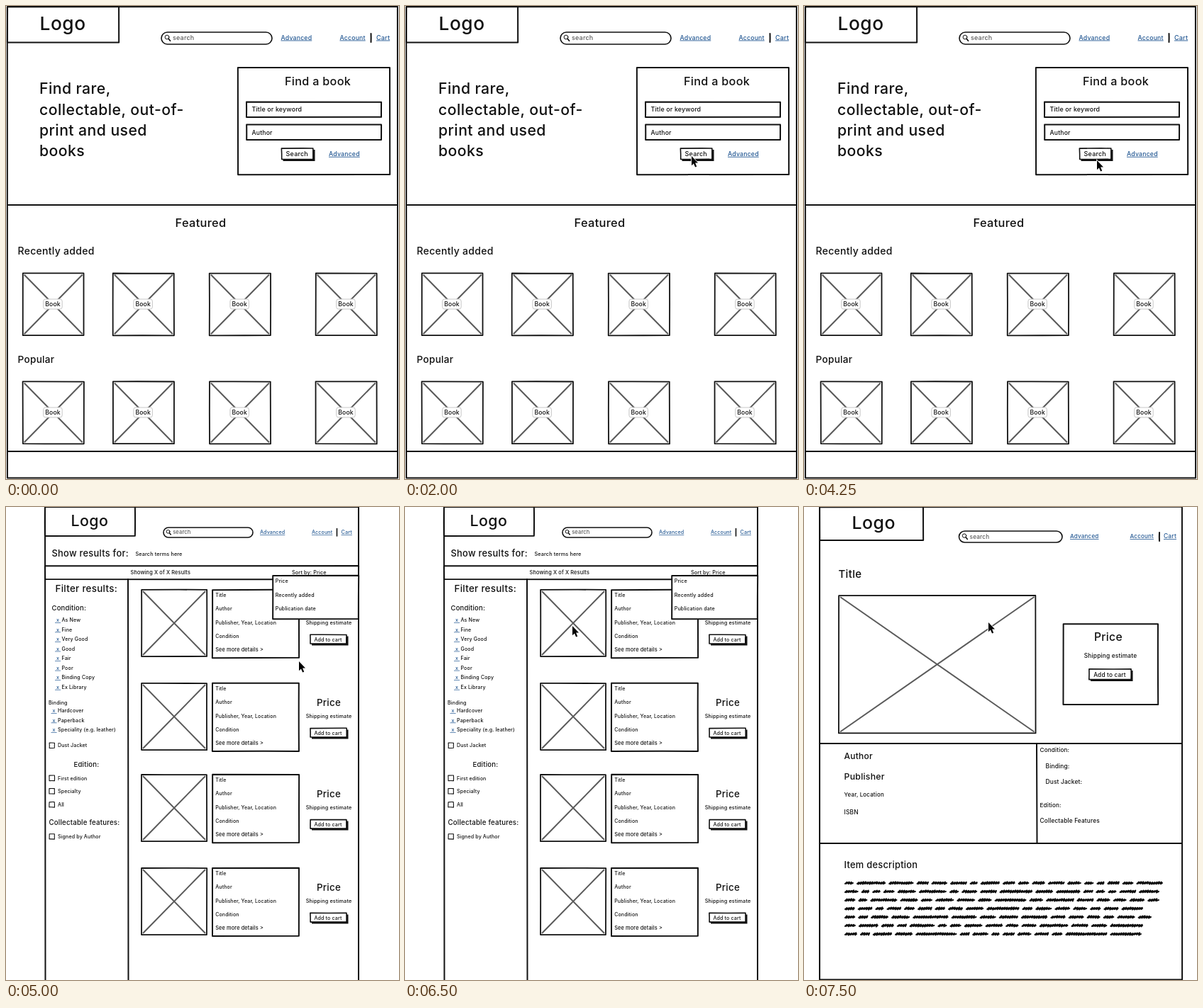
An HTML page that plays this animation: 554 by 668 pixels, repeating every 8 s.

```html
<!DOCTYPE html>
<html lang="en">
<head>
<meta charset="utf-8">
<title>Bookshop wireframe</title>
<style>
html, body { margin: 0; width: 100%; height: 100%; overflow: hidden; background: #fff; }
svg { display: block; }
text { font-family: Inter, "Open Sans", sans-serif; font-weight: 500; letter-spacing: 0.02em; fill: #111; white-space: pre; }
.link { fill: #265a94; text-decoration: underline; }
.hint { fill: #5c5c5c; }
.ink { stroke: #111; fill: none; stroke-linejoin: round; stroke-linecap: round; }
.cross { stroke: #5a5a5a; stroke-width: 2; fill: none; }
</style>
</head>
<body>
<svg id="stage" width="554" height="668" viewBox="0 0 554 668"></svg>
<script>
let seed = 7;
const rand = () => (seed = (seed * 16807) % 2147483647) / 2147483647;
const wob = a => (rand() - 0.5) * a;
const n = v => v.toFixed(2);

const text = (x, y, size, s, cls = '', anchor = 'start') =>
  `<text x="${x}" y="${y}" font-size="${n(size * 0.94)}" class="${cls}" text-anchor="${anchor}">${s.replace('>', '&gt;')}</text>`;
const link = (x, y, size, s) => text(x, y, size, s, 'link');
const mid = (x, y, size, s) => text(x, y, size, s, '', 'middle');

// Hand-drawn line: a straight run with a slight bow
const bow = (x1, y1, x2, y2) =>
  `Q${n((x1 + x2) / 2 + wob(0.7))} ${n((y1 + y2) / 2 + wob(0.7))} ${n(x2)} ${n(y2)}`;
const line = (x1, y1, x2, y2, w = 2) =>
  `<path class="ink" stroke-width="${w}" d="M${x1} ${y1}${bow(x1, y1, x2, y2)}"/>`;

function box(x1, y1, x2, y2, w = 2, fill = 'none') {
  const p = [[x1, y1], [x2, y1], [x2, y2], [x1, y2]].map(q => q.map(v => v + wob(0.4)));
  let d = `M${n(p[0][0])} ${n(p[0][1])}`;
  for (let i = 0; i < 4; i++) d += bow(...p[i], ...p[(i + 1) % 4]);
  return `<path class="ink" stroke-width="${w}" style="fill:${fill}" d="${d}Z"/>`;
}

const picture = (x1, y1, x2, y2) =>
  `<path class="cross" d="M${x1 + 2} ${y1 + 2}L${x2 - 2} ${y2 - 2}M${x2 - 2} ${y1 + 2}L${x1 + 2} ${y2 - 2}"/>` +
  box(x1, y1, x2, y2, 1.8);

const button = (x1, y1, x2, y2, base, size, s) =>
  `<path d="M${x1 + 2} ${y1 + 2}H${x2 + 2.5}V${y2 + 2.5}H${x1 + 2}Z" fill="#111"/>` +
  box(x1, y1, x2, y2, 1.6, '#fff') + mid((x1 + x2) / 2 - 0.5, base, size, s);

function pill(x1, y1, x2, y2, size) {
  const h = y2 - y1, k = h / 17, cx = x1 + 8 * k, cy = y1 + 7 * k;
  return `<rect class="ink" stroke-width="1.6" x="${x1}" y="${y1}" width="${x2 - x1}" height="${h}" rx="${h / 2}"/>` +
    `<circle class="ink" stroke-width="1" cx="${cx}" cy="${cy}" r="${2.9 * k}"/>` +
    `<path class="ink" stroke-width="${1.7 * k}" d="M${cx + 2.2 * k} ${cy + 2.4 * k}l${2.4 * k} ${2.8 * k}"/>` +
    text(x1 + 16 * k, y1 + h / 2 + 2.8 * k, size, 'search', 'hint');
}

function home() {
  let s = box(2, 1, 552, 666.5) + box(2, 1, 159, 51.5) + text(47.5, 34, 28, 'Logo') +
    pill(219, 37, 375, 54, 9.6) + link(387.5, 47.5, 9.3, 'Advanced') +
    link(470.5, 47.5, 9.3, 'Account') + line(514.5, 39, 514.5, 51) + link(522, 47.5, 9.6, 'Cart');
  ['Find rare,', 'collectable, out-of-', 'print and used', 'books'].forEach((t, i) => {
    s += text(47, 124.2 + i * 29.3, 22.6, t);
  });
  s += box(327, 87, 541, 238) + mid(439.5, 112.3, 17.2, 'Find a book') +
    box(339, 135.5, 529, 157) + text(346.5, 149.3, 9.4, 'Title or keyword') +
    box(339, 167.5, 529, 189) + text(346.5, 181.5, 9.2, 'Author') +
    button(388.5, 201, 433, 216.5, 212.3, 9.6, 'Search') + link(455, 211.8, 9.3, 'Advanced') +
    line(2, 281, 552, 281) + mid(274.5, 312, 17.4, 'Featured') +
    text(16.5, 351, 14.9, 'Recently added') + text(16.5, 504, 14.5, 'Popular');
  for (const y of [377.5, 530.5]) for (const x of [23.7, 150.9, 286.9, 436.7]) {
    s += picture(x, y, x + 86, y + 87.7) +
      `<rect x="${x + 29}" y="${y + 36.5}" width="26.5" height="14" rx="3" fill="#fff" stroke="#c8c8c8"/>` +
      mid(x + 42.3, y + 46.8, 9.2, 'Book');
  }
  return s + line(2, 629, 552, 629);
}

const check = (y, s) => box(61, y - 6.3, 68.3, y + 1, 1.1) + text(73, y, 7.5, s);
const option = (x, y, s) => link(x, y, 7.5, ' x ') + text(x + 9.5, y, 7.5, s);

function results() {
  let s = line(55, 0, 497, 0) + line(55, 0, 55.5, 668) + line(497, 0, 497, 668) +
    box(55, 0, 182, 41) + text(91.5, 27, 22.7, 'Logo') +
    pill(222, 29, 348, 43, 8) + link(358, 38, 7.5, 'Advanced') +
    link(431, 38, 7.5, 'Account') + line(466.5, 30.5, 466.5, 41, 1.6) + link(472.5, 38, 7.7, 'Cart') +
    text(64.5, 69.5, 13.7, 'Show results for:') + text(182.5, 69, 7.7, 'Search terms here') +
    box(55, 83, 497, 102) + text(175.5, 95.2, 7.8, 'Showing X of X Results') +
    text(403, 95.2, 7.7, 'Sort by: Price') + line(172, 102, 172.5, 668) +
    text(69.5, 120, 14.3, 'Filter results:') + text(64.5, 146, 10.1, 'Condition:') +
    text(60, 279, 7.6, 'Binding') + check(339.3, 'Dust Jacket') +
    text(95.5, 367, 10.2, 'Edition:') + check(385.5, 'First edition') +
    check(404, 'Specialty') + check(423, 'All') +
    text(60.5, 449, 10.3, 'Collectable features:') + check(468, 'Signed by Author');
  ['As New', 'Fine', 'Very Good', 'Good', 'Fair', 'Poor', 'Binding Copy', 'Ex Library'].forEach((t, i) => {
    s += option(69, 162 + i * 13.55, t);
  });
  ['Hardcover', 'Paperback', 'Speciality (e.g. leather)'].forEach((t, i) => {
    s += option(63.5, 290 + i * 13.5, t);
  });
  for (const y of [0, 132, 261, 393]) {
    s += picture(191, y + 117, 283, y + 211) + box(291, y + 117, 413, y + 213);
    ['Title', 'Author', 'Publisher, Year, Location', 'Condition', 'See more details >'].forEach((t, i) => {
      s += text(295.2, y + 127 + i * 19.25, i < 4 ? 7.45 : 7.8, t);
    });
    s += mid(455, y + 149.3, 14.2, 'Price') + mid(455, y + 166.3, 7.75, 'Shipping estimate') +
      button(429, y + 180.5, 480, y + 193, y + 189.8, 7.55, 'Add to cart');
  }
  s += box(376, 97, 497, 158, 2, '#fff');
  ['Price', 'Recently added', 'Publication date'].forEach((t, i) => {
    s += text(379.7, 107.2 + i * 19.4, 7.6, t);
  });
  return s;
}

// One scribbled word of slanted pen strokes
function scribble(x, y, w) {
  let d = `M${n(x)} ${n(y + 1)}`;
  for (let p = 0; p < w - 2; p += 3.2) {
    d += `L${n(x + p + 2.6)} ${n(y - 1.3 + wob(0.8))}L${n(x + p + 1.4)} ${n(y + 1.3 + wob(0.8))}`;
  }
  return d + `L${n(x + w)} ${n(y)}`;
}

function details() {
  let s = box(22, 0, 533, 667.5) + box(22, 0, 168, 47) + text(67.5, 31, 26.5, 'Logo') +
    pill(218.5, 34, 364, 50, 8.8) + link(375, 44, 8.6, 'Advanced') +
    link(459.5, 44, 8.6, 'Account') + line(501, 36, 501, 48) + link(507, 44, 9, 'Cart') +
    text(48.5, 100, 16, 'Title') + picture(49, 125, 326.5, 319.5) +
    box(365.5, 165, 499, 279) + mid(429, 189.3, 16.7, 'Price') +
    mid(432, 212.5, 8.9, 'Shipping estimate') +
    button(402, 229, 461, 243.5, 239.5, 8.8, 'Add to cart') +
    line(22, 334, 533, 334) + line(22, 475, 533, 475) + line(328, 334, 328.5, 475) +
    text(56.5, 356, 12.8, 'Author') + text(56.5, 385, 13.1, 'Publisher') +
    text(56.5, 409, 8.5, 'Year, Location') + text(56.5, 434.3, 8.9, 'ISBN') +
    text(332.5, 346, 8.7, 'Condition:') + text(340.5, 368.7, 8.9, 'Binding:') +
    text(340.5, 391, 8.9, 'Dust Jacket:') + text(332.5, 424.3, 8.6, 'Edition:') +
    text(332.5, 446.3, 8.8, 'Collectable Features') + text(56.5, 510, 13.7, 'Item description');
  let d = '';
  [505, 500, 500, 477, 489, 477, 475].forEach((end, i) => {
    const y = 531 + i * 12;
    for (let x = 58; x < end - 6;) {
      let w = 9 + rand() * (rand() < 0.25 ? 48 : 17);
      if (x + w > end - 13) w = end - x;
      d += scribble(x, y, w);
      x += w + 6;
    }
  });
  return s + `<path class="ink" stroke-width="2" d="${d}"/>`;
}

const stage = document.getElementById('stage');
stage.innerHTML = '<rect width="554" height="668" fill="#fff"/>' +
  [home, results, details].map(f => `<g>${f()}</g>`).join('') +
  '<path id="cursor" d="M0 0V13.2L2.9 10.5L5.1 15.6L7.2 14.7L5.1 9.6H9Z" fill="#000" stroke="#fff" stroke-width="1.6" paint-order="stroke"/>';
const pages = stage.querySelectorAll('g');
const cursor = document.getElementById('cursor');

// [start in ms, tip x, tip y]; the pointer jumps between samples
const path = [
  [0, 554, 41], [750, 427, 255], [1000, 415, 225], [1250, 411, 216],
  [1500, 400, 182], [1750, 402, 205], [2000, 404, 212], [3250, 413, 184],
  [3500, 439, 190], [3750, 461, 211], [4000, 422, 207], [4250, 413, 218],
  [6000, 356, 205], [6250, 225, 187], [6500, 236, 168], [6750, 298, 165],
  [7000, 261, 163], [7250, 260, 163]
];

function draw(t) {
  const page = t < 5000 ? 0 : t < 7500 ? 1 : 2;
  pages.forEach((g, i) => { g.style.display = i === page ? '' : 'none'; });
  const [, x, y] = path.filter(p => p[0] <= t).pop();
  cursor.setAttribute('transform', `translate(${x} ${y})`);
}

function tick() {
  draw(performance.now() % 8000);
  requestAnimationFrame(tick);
}
tick();
</script>
</body>
</html>
```
